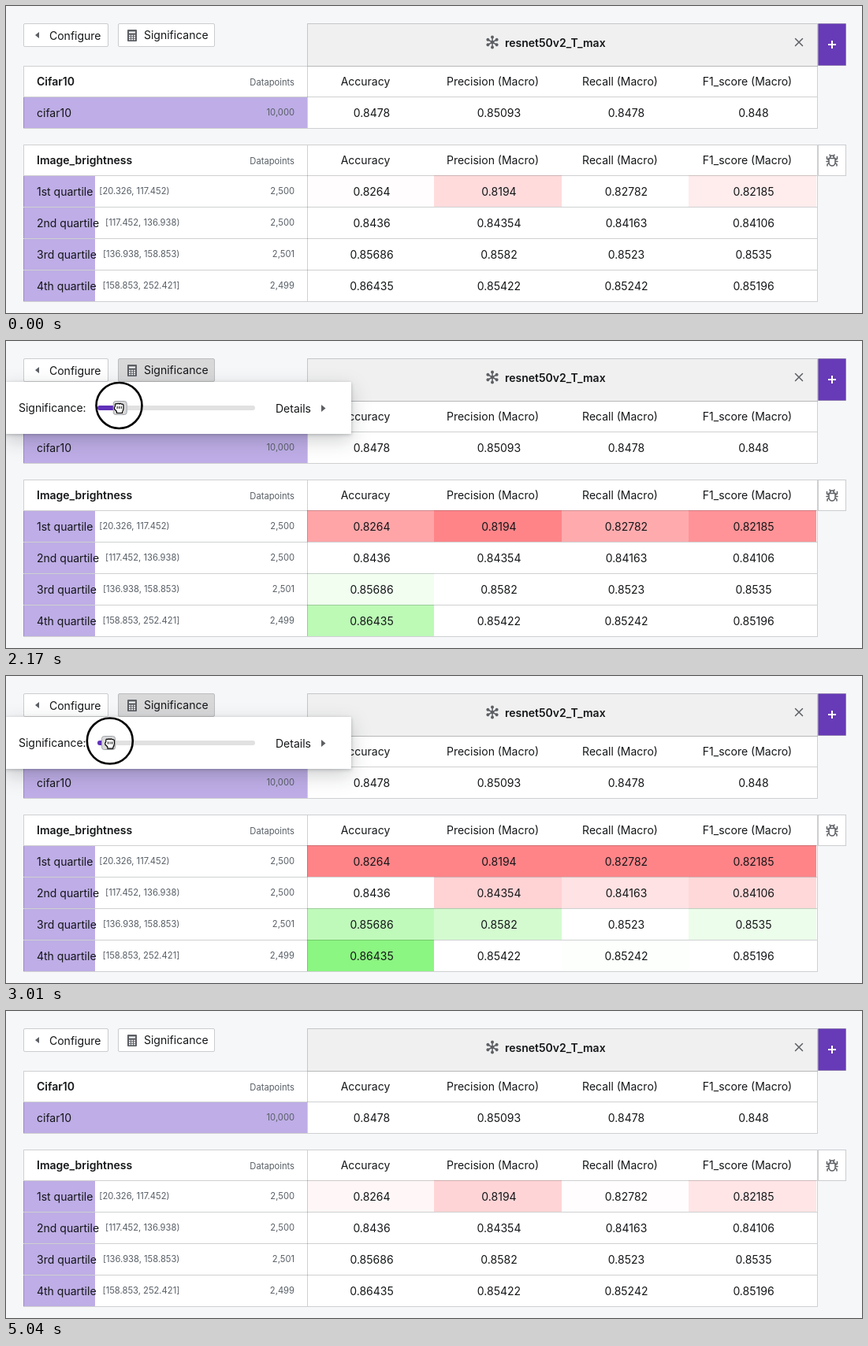
Write an HTML page that moves like this. It is 1086x390 px and loops after 5.32 s.

```html
<!DOCTYPE html>
<html lang="en">
<head>
<meta charset="utf-8">
<title>Significance slider</title>
<style>
  html, body { margin: 0; width: 100%; height: 100%; overflow: hidden; background: #f6f7f9; }
  svg { display: block; width: 1086px; height: 390px; }
  text { font: 14px Inter, sans-serif; fill: #141618; white-space: pre; }
  .bold { font-weight: 600; }
  .small { font-size: 11.2px; fill: #585f66; }
  .mid { text-anchor: middle; }
  .end { text-anchor: end; }
  .line { fill: none; stroke: rgba(16,22,26,.2); }
  .box { fill: #fff; stroke: rgba(16,22,26,.2); }
  .icon { fill: #5c5f64; }
  .stroke { fill: none; stroke: #5c5f64; stroke-width: 1.5; stroke-linecap: round; }
  .cast { filter: drop-shadow(0 1px 2px rgba(16,22,26,.25)) drop-shadow(0 8px 12px rgba(16,22,26,.2)); }
  .hand { fill: #fff; stroke: #000; stroke-width: 1.2; stroke-linejoin: round; }
</style>
</head>
<body>
<svg viewBox="0 0 1086 390">
  <g id="table"></g>

  <rect class="box" x="382.5" y="22.5" width="647" height="54" style="fill:#f0f0f0"/>
  <g id="network" class="icon" transform="translate(617 46)"></g>
  <text class="bold" x="633" y="52">resnet50v2_T_max</text>
  <path class="stroke" d="M1001.5 41.5l9 9m0-9l-9 9"/>
  <rect class="box" x="1030.5" y="22.5" width="35" height="53" style="fill:#673ab7"/>
  <path d="M1043 49h10m-5-5v10" stroke="#fff" stroke-width="2"/>

  <rect class="box" x="1030.5" y="176.5" width="35" height="39"/>
  <path class="stroke" transform="translate(1048 196)"
    d="M-4-2.5H4V2.5a4 4.5 0 0 1-8 0zM-2.5-3a2.500 3 0 0 1 5 0M-4-.5L-6.500-2V-4.500M4-.5L6.500-2V-4.500M-4 1.500h-3M4 1.500h3M-4 3.500L-6 5V7M4 3.500L6 5V7M-2-5.500L-3-7M2-5.500L3-7"/>

  <rect class="box" x="22.5" y="22.5" width="107" height="29" rx="1.5"/>
  <path class="icon" d="M37 37l5-4v8z"/>
  <text x="55" y="43">Configure</text>
  <rect id="button" class="box" x="142.5" y="22.5" width="122" height="29" rx="1.5"/>
  <g transform="translate(154 30)">
    <rect class="icon" width="12" height="15" rx="1"/>
    <path d="M2 7.5h8M2 10h8M2 12.5h8" stroke="#fff" stroke-width="1.6" stroke-dasharray="2 1"/>
    <path d="M2 3.5h8" stroke="#fff" stroke-width="2"/>
  </g>
  <text x="175" y="42">Significance</text>

  <g id="popup">
    <rect class="cast" x="-1" y="52" width="439" height="66" rx="1" fill="#fff"/>
    <text x="16" y="90">Significance:</text>
    <rect x="116" y="82" width="200" height="6" rx="3" fill="#e1e1e1"/>
    <rect id="fill" x="116" y="82" height="6" rx="3" fill="#6031b9"/>
    <rect id="thumb" y="76.5" width="17" height="17" rx="3" stroke="#a0a4a8"/>
    <text x="342" y="91">Details</text>
    <path class="icon" d="M400 81l5.5 4.5-5.5 4.5z"/>
  </g>

  <g id="cursor">
    <circle id="ring" r="29" fill="none" stroke="#000" stroke-width="2.6"/>
    <path id="arrow" d="M0 0V14.5L3.4 11.3 5.7 16.6 8.3 15.5 6 10.3H10.5Z" fill="#000" stroke="#fff"/>
    <path id="point" class="hand" d="M-1.5 8V1q1.500-2 3 0V6q1.500-1 2.800.4 1.500-.8 2.700.5 2-.4 2.300 1.300V11q0 3-2 5.500H0L-5 10q0-2 2-1.500z"/>
    <g id="fist" transform="translate(0 1)">
      <path class="hand" d="M-5 0V-2.500q1-1.500 2.500-.5 1-1.500 2.700 0 1.300-1.200 2.700.2 2-.6 2.600 1V2.500q0 2.500-1.500 4.500V8.500h-7V6.500L-6 3.500V1.500z"/>
      <path d="M-2.300 0v3M.2 0v3M2.700 0v3" stroke="#000" fill="none"/>
    </g>
  </g>
</svg>
<script>
const $ = id => document.getElementById(id);
const clamp = (v, lo, hi) => Math.min(hi, Math.max(lo, v));
const LOOP = 5320, STEP = 70;
const PRESS = 1260, DRAG = 1330, RELEASE = 4060;
const metrics = ['Accuracy', 'Precision (Macro)', 'Recall (Macro)', 'F1_score (Macro)'];
const overall = '0.8478 0.85093 0.8478 0.848';
const quartiles = [
  ['1st quartile', '[20.326, 117.452)', '2,500', '0.8264 0.8194 0.82782 0.82185'],
  ['2nd quartile', '[117.452, 136.938)', '2,500', '0.8436 0.84354 0.84163 0.84106'],
  ['3rd quartile', '[136.938, 158.853)', '2,501', '0.85686 0.8582 0.8523 0.8535'],
  ['4th quartile', '[158.853, 252.421]', '2,499', '0.86435 0.85422 0.85242 0.85196']
];

// Cursor stops: time, x, y
const stops = [
  [140, 226, -20], [420, 212, 40], [630, 211, 41], [1050, 217, 74],
  [DRAG, 221, 79], [1750, 178, 82], [2310, 132, 82], [2700, 120, 83],
  [2910, 120, 83], [3570, 198, 80], [3990, 211, 78], [4480, 240, -24]
];

function cursorAt(t) {
  const n = stops.findIndex(s => s[0] > t);
  if (n < 1) return (n ? stops[stops.length - 1] : stops[0]).slice(1);
  const a = stops[n - 1], b = stops[n], k = (t - a[0]) / (b[0] - a[0]);
  return [1, 2].map(i => a[i] + (b[i] - a[i]) * k);
}

// The thumb trails the pointer slightly while dragged
const thumbAt = t => Math.max(129, cursorAt(clamp(t - 15, DRAG, 3990))[0]);

// A cell is tinted once its difference from the overall score exceeds the threshold
function tint(diff, thumbX) {
  const threshold = .0345 * ((thumbX - 116) / 200) ** .77;
  const a = clamp(Math.log2(Math.abs(diff) / threshold) / 2, 0, 1);
  const full = diff < 0 ? [255, 132, 136] : [132, 245, 122];
  return `rgb(${full.map(v => Math.round(255 + (v - 255) * a))})`;
}

function add(parent, tag, attrs, text = '') {
  const el = document.createElementNS('http://www.w3.org/2000/svg', tag);
  for (const k in attrs) el.setAttribute(k, attrs[k]);
  el.textContent = text;
  return parent.appendChild(el);
}

const table = $('table');
const rect = (x, y, width, height, fill) => add(table, 'rect', { x, y, width, height, fill });
const label = (x, y, text, cls = '') => add(table, 'text', { x, y, class: cls }, text);
const cellX = i => Math.round(383 + i * 161.5 - .1);
const centre = i => 464 + i * 161.5;

function header(y, title) {
  label(39, y + 25, title, 'bold');
  label(366, y + 25, 'Datapoints', 'small end');
  metrics.forEach((m, i) => label(centre(i) - 8, y + 25, m, 'mid'));
}

function row(y, name, range, count, values, barWidth) {
  rect(22, y, barWidth, 39, '#beade6');
  const cells = values.split(' ').map((v, i) => {
    const x = cellX(i) - 1;
    const el = rect(x, y - 1, cellX(i + 1) - 1 - x, 40, '#fff');
    label(centre(i), y + 25, v, 'mid');
    return { el, diff: v - overall.split(' ')[i] };
  });
  const width = label(39, y + 25, name).getComputedTextLength();
  label(47 + width, y + 23, range, 'small');
  label(366, y + 23, count, 'small end');
  return cells;
}

function grid(top, rows) {
  const height = rows * 40 - 1;
  let d = `M22.5 ${top + .5}H1029.5v${height}H22.5ZM382.5 ${top + 1}v${height - 1}`;
  for (let i = 1; i < rows; i++) d += `M23 ${top + i * 40 - .5}H1029`;
  add(table, 'path', { d, class: 'line' });
}

rect(22, 76, 1008, 80, '#fff');
header(76, 'Cifar10');
row(116, 'cifar10', '', '10,000', overall, 360);
grid(76, 2);

rect(22, 176, 1008, 200, '#fff');
header(176, 'Image_brightness');
const cells = quartiles.flatMap((q, i) => row(216 + i * 40, ...q, 91));
grid(176, 5);

add($('network'), 'circle', { r: 2.2 });
for (let a = 0; a < 360; a += 60) {
  const spoke = add($('network'), 'g', { transform: `rotate(${a})` });
  add(spoke, 'path', { d: 'M0 0V-6', class: 'stroke' });
  add(spoke, 'circle', { cy: -6.5, r: 2 });
}

const show = (id, on) => $(id).style.display = on ? '' : 'none';

function draw(t) {
  const within = (from, to) => t >= from && t < to;
  const x = thumbAt(t);
  const held = within(PRESS, RELEASE), onButton = within(350, 770);

  $('button').style.fill = within(420, 4970) ? '#d8d8d9' : onButton ? '#ebedee' : '#fff';
  $('popup').style.opacity = within(770, 4970) ? 1 : within(700, 5040) ? .5 : 0;
  $('fill').setAttribute('width', x - 116);
  $('thumb').setAttribute('x', x - 8.5);
  $('thumb').setAttribute('fill', held ? '#d8d8d9' : '#fff');

  $('cursor').setAttribute('transform', `translate(${cursorAt(t)})`);
  show('cursor', within(140, 4550));
  show('ring', held || within(420, 560));
  show('fist', held);
  show('point', onButton);
  show('arrow', !held && !onButton);

  for (const { el, diff } of cells) el.setAttribute('fill', tint(diff, x));
}

const start = performance.now();
function tick() {
  const t = (performance.now() - start) % LOOP;
  draw(Math.floor(t / STEP) * STEP);
  requestAnimationFrame(tick);
}
tick();
</script>
</body>
</html>
```
